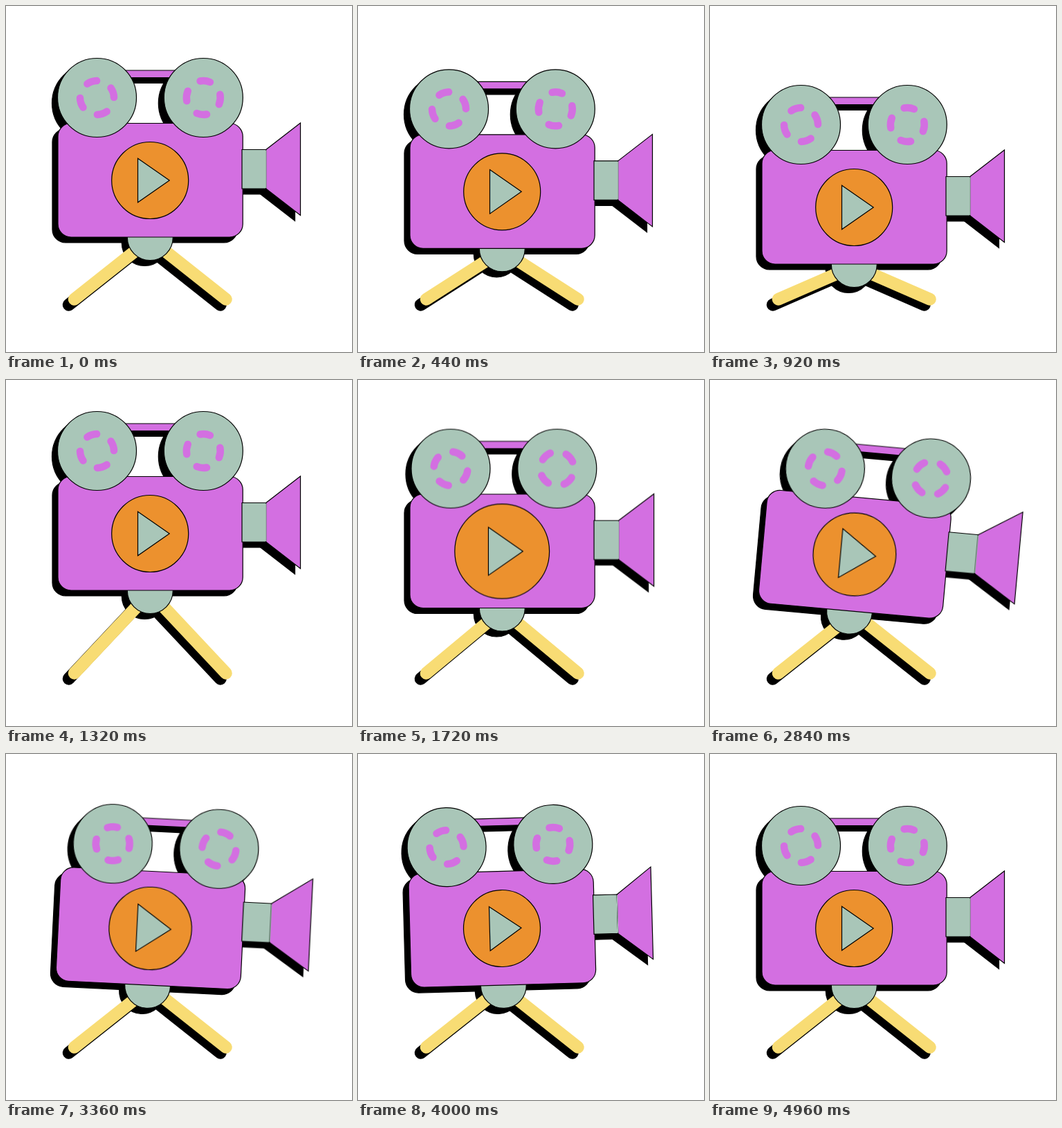
An HTML page for the animation above (5 s loop, 500 by 500 pixels).

```html
<!DOCTYPE html>
<html lang="en">
<head>
<meta charset="utf-8">
<title>Film camera</title>
<style>
  html, body { margin: 0; width: 100%; height: 100%; overflow: hidden; background: #fff; }
  svg { display: block; width: 100%; height: 100%; }
  #scene { filter: drop-shadow(-8px 8px 0 #000); }
  .ink { stroke: #000; stroke-width: 1.2; }
  .ink, .ink * { vector-effect: non-scaling-stroke; }
  .pink { fill: #d36fe1; }
  .mint { fill: #a9c6b8; }
  .dash { fill: none; stroke: #d36fe1; stroke-width: 10.5; stroke-linecap: round; }
  #legs { fill: none; stroke: #f8dc74; stroke-width: 18; stroke-linecap: round; }
</style>
</head>
<body>
<svg viewBox="0 0 500 500">
  <defs>
    <path id="mark" class="dash" d="M-7.2-23.4A24.5 24.5 0 0 1 7.2-23.4"/>
    <g id="marks">
      <use href="#mark"/>
      <use href="#mark" transform="rotate(90)"/>
      <use href="#mark" transform="rotate(180)"/>
      <use href="#mark" transform="rotate(270)"/>
    </g>
  </defs>
  <g id="scene">
    <path id="legs"/>
    <g id="camera">
      <circle class="mint ink" cx="208.3" cy="334.5" r="33"/>
      <rect class="pink ink" x="75" y="169.5" width="267.2" height="164.5" rx="19"/>
      <g id="lens" class="ink">
        <path class="mint" d="M341 207.5H375.7V264H341Z"/>
        <path class="pink" d="M375.7 207.5L425.5 169V302.5L375.7 264Z"/>
        <path stroke="#a9c6b8" d="M375.7 208.5V263"/>
      </g>
      <g id="reels">
        <rect class="pink ink" x="131" y="93" width="154" height="10.5"/>
        <g transform="translate(131.5 132.5)">
          <circle class="mint ink" r="57"/>
          <use id="left" href="#marks"/>
        </g>
        <g transform="translate(285.3 132.5)">
          <circle class="mint ink" r="57"/>
          <use id="right" href="#marks"/>
        </g>
      </g>
      <circle id="disc" class="ink" cx="208.2" cy="252" r="55.5" fill="#ec912e"/>
      <path id="play" class="mint ink" d="M-22.5-31.8L23.2 0L-22.5 31.8Z"/>
    </g>
  </g>
</svg>
<script>
const LOOP = 5000;

// Each track is a list of [time, value] keys, eased in and out.
const tracks = {
  drop:  [[0, 0], [1000, 39.7], [1300, -30], [1600, -30], [1760, 0]],
  slide: [[1400, 0], [3000, 1], [3980, 0]],
  tilt:  [[2300, 0], [3000, 6], [3900, -3], [4200, 2.5], [4800, 0]],
  disc:  [[1400, 1], [1760, 1.24], [2320, 0.883], [3000, 1.11], [3980, 1]],
  play:  [[1400, 1], [1960, 1.15], [2320, 1.15], [3000, 1.11], [3980, 1]]
};

function valueAt(keys, time) {
  const next = keys.findIndex(key => key[0] > time);
  if (next === 0) return keys[0][1];
  if (next < 0) return keys[keys.length - 1][1];
  const [[t0, a], [t1, b]] = [keys[next - 1], keys[next]];
  const u = (time - t0) / (t1 - t0);
  return a + (b - a) * u * u * (3 - 2 * u);
}

const place = (id, transform) =>
  document.getElementById(id).setAttribute("transform", transform);

function draw(time) {
  const pose = {};
  for (const name in tracks) pose[name] = valueAt(tracks[name], time);
  const { drop, slide, tilt, disc, play } = pose;
  const spin = 410 * slide;

  document.getElementById("legs")
    .setAttribute("d", `M98.7 423.7L208.3 ${337 + drop}L317.8 423.7`);
  place("camera", `translate(0 ${drop}) rotate(${tilt} 208.3 260)`);
  place("reels", `translate(${23.7 * slide} 0)`);
  place("left", `rotate(${spin - 18})`);
  place("right", `rotate(${spin + 6})`);
  place("lens", `translate(341 0) scale(${1 + 0.235 * slide} 1) translate(-341 0)`);
  document.getElementById("disc").setAttribute("r", 55.5 * disc);
  place("play", `translate(213 252) scale(${play})`);
}

function tick() {
  draw(performance.now() % LOOP);
  requestAnimationFrame(tick);
}
tick();
</script>
</body>
</html>
```
